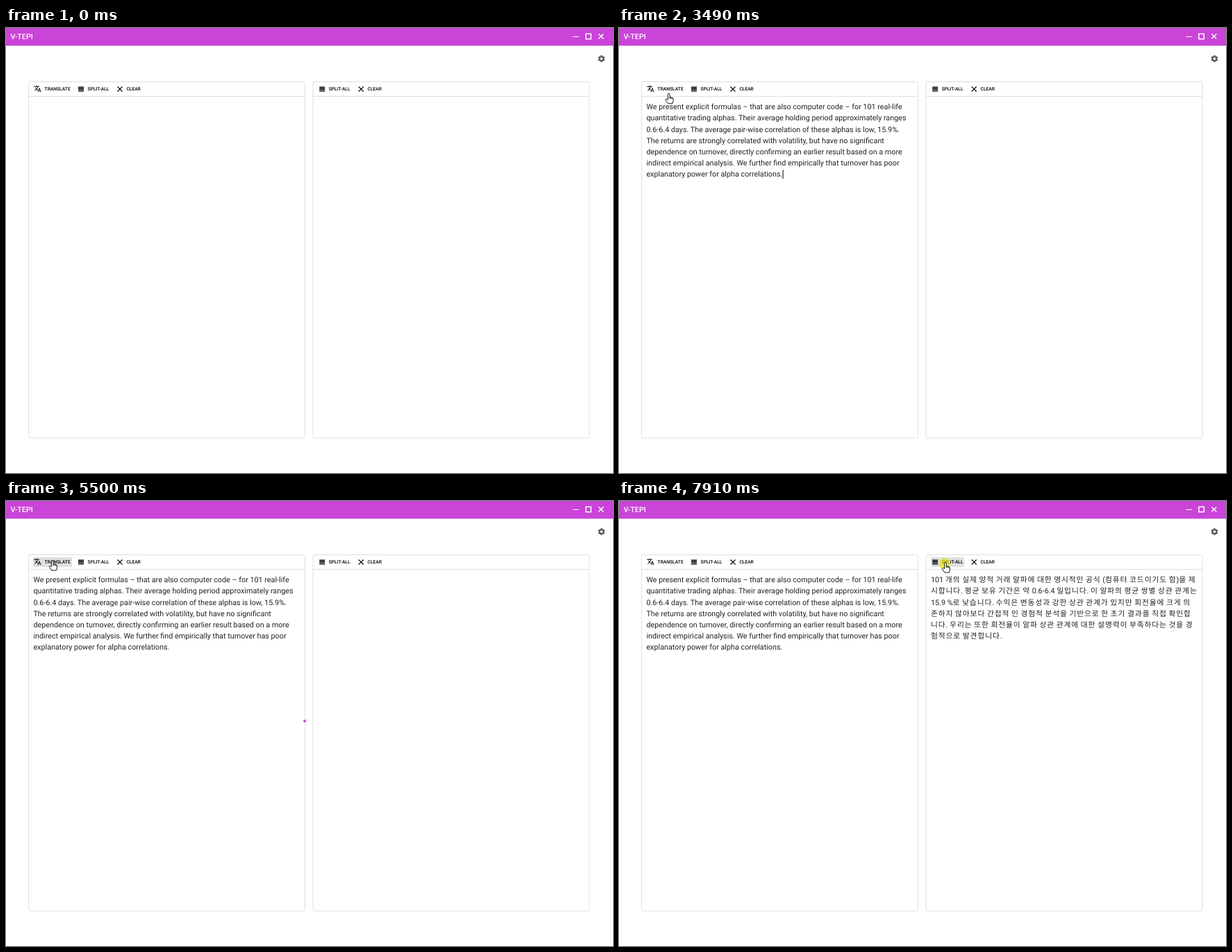
These frames come from a looping animation (874x641 px, 7990 ms). An HTML page:

```html
<!DOCTYPE html>
<html lang="en">
<head>
<meta charset="utf-8">
<title>Translator window</title>
<style>
  html, body { margin: 0; width: 100%; height: 100%; overflow: hidden; background: #fff; }
  svg { display: block; width: 100%; height: 100%; }
  text { font: 10.79px Roboto, "Noto Sans CJK KR", "Noto Sans CJK", sans-serif; fill: #222; white-space: pre; text-rendering: geometricPrecision; }
  .title { font-weight: 500; fill: #fff; }
  .label { font-size: 6.7px; font-weight: 500; fill: #000; }
  .hangul { letter-spacing: .08em; }
  .panel { fill: none; stroke: #dfdfdf; }
  .stroke { fill: none; stroke: #000; stroke-width: 1.1; }
  .white { stroke: #fff; stroke-width: 1.5; }
  .pointer { fill: #fff; stroke: #000; stroke-width: .9; stroke-linejoin: round; }
</style>
</head>
<body>
<svg viewBox="0 0 874 641">
  <defs>
    <path id="cross" d="M-3.5-3.5 3.5 3.5M3.5-3.5-3.5 3.5"/>
    <path id="lines" d="M-4-2.9h8M-4-1h8M-4 .9h8M-4 2.8h8"/>
    <clipPath id="buttonClip"><rect x="39" y="81" width="56" height="14" rx="1.5"/></clipPath>
  </defs>

  <rect width="874" height="25.5" fill="#c944d7"/>
  <text class="title" x="6.6" y="15.8">V-TEPI</text>
  <path class="stroke white" style="stroke-width:1" d="M816 12.5h9"/>
  <rect class="stroke white" x="834.9" y="8.4" width="7.4" height="7.4"/>
  <use class="stroke white" href="#cross" transform="translate(856.8 12)"/>
  <g transform="translate(857.4 44.2)" fill="none" stroke="#555">
    <circle r="2.9" stroke-width="2"/>
    <circle r="4.2" stroke-width="1.7" pathLength="6" stroke-dasharray=".5 .5" stroke-dashoffset="-.25"/>
  </g>

  <rect id="hoverLeft" x="39" y="81" width="56" height="14" rx="1.5"/>
  <rect id="hoverRight" x="449" y="81" width="48" height="14" rx="1.5"/>
  <g clip-path="url(#buttonClip)"><circle id="ripple" cx="67" cy="88"/></g>

  <path transform="translate(39.8 81.9) scale(.47)" d="M12.87 15.07l-2.54-2.51.03-.03c1.74-1.94 2.98-4.17 3.71-6.53H17V4h-7V2H8v2H1v1.99h11.17C11.5 7.92 10.44 9.75 9 11.35 8.07 10.32 7.3 9.19 6.69 8h-2c.73 1.63 1.73 3.17 2.98 4.56l-5.09 5.02L4 19l5-5 3.11 3.11.76-2.04zM18.5 10h-2L12 22h2l1.12-3h4.75L21 22h2l-4.5-12zm-2.62 7l1.62-4.33L19.12 17h-3.24z"/>
  <text class="label" x="55.6" y="90.3">TRANSLATE</text>
  <g id="panels"></g>
  <g id="english"></g>
  <g id="korean"></g>
  <rect id="caret" width="1" fill="#000"/>

  <circle id="spinner" r="18.4" fill="none" stroke="#c944d7" stroke-width="3.3" pathLength="125.66"/>
  <circle id="click" r="8.2" fill="#eee600" opacity=".65"/>
  <g id="cursor">
    <path id="arrow" class="pointer" d="M0 0V12.5L2.9 9.9 4.9 14.4 6.8 13.5 4.9 9.2H8.8Z"/>
    <path id="beam" class="stroke" d="M-2.5-5H-.8L0-4.4.8-5H2.5M0-4.4V4.4M-2.5 5H-.8L0 4.4.8 5H2.5"/>
    <g id="hand">
      <path class="pointer" d="M-1.3 9V1.2a1.3 1.3 0 0 1 2.6 0V5.4L3.2 5.6 5 6.2 6.4 7.2V10.5L5.3 14.5H-1.2L-4.4 9.7a1 1 0 0 1 1.6-1.3Z"/>
      <path class="pointer" d="M1.3 5.4v2.4M3.2 5.6v2.2M5 6.2v1.8"/>
    </g>
  </g>
</svg>
<script>
const LOOP = 7990, LINE = 16.2, FIRST_BASELINE = 117.2;
const $ = id => document.getElementById(id);
const set = (id, attrs) => { for (const k in attrs) $(id).setAttribute(k, attrs[k]); };
const show = (id, on) => { $(id).style.display = on ? '' : 'none'; };
const clamp = v => Math.max(0, Math.min(1, v));
const within = (v, a, b) => v >= a && v < b;
// Close to the CSS ease-in-out curve.
const ease = p => p ** 1.74 / (p ** 1.74 + (1 - p) ** 1.74);

const english = [
  'We present explicit formulas – that are also computer code – for 101 real-life',
  'quantitative trading alphas. Their average holding period approximately ranges',
  '0.6-6.4 days. The average pair-wise correlation of these alphas is low, 15.9%.',
  'The returns are strongly correlated with volatility, but have no significant',
  'dependence on turnover, directly confirming an earlier result based on a more',
  'indirect empirical analysis. We further find empirically that turnover has poor',
  'explanatory power for alpha correlations.'
];
const korean = [
  '101 개의 실제 양적 거래 알파에 대한 명시적인 공식 (컴퓨터 코드이기도 함)을 제',
  '시합니다. 평균 보유 기간은 약 0.6-6.4 일입니다. 이 알파의 평균 쌍별 상관 관계는',
  '15.9 %로 낮습니다. 수익은 변동성과 강한 상관 관계가 있지만 회전율에 크게 의',
  '존하지 않아보다 간접적 인 경험적 분석을 기반으로 한 초기 결과를 직접 확인합',
  '니다. 우리는 또한 회전율이 알파 상관 관계에 대한 설명력이 부족하다는 것을 경',
  '험적으로 발견합니다.'
];
const paragraph = (lines, x) => lines.map((line, i) =>
  `<text x="${x}" y="${FIRST_BASELINE + i * LINE}">${
    line.replace(/[가-힣]+/g, '<tspan class="hangul">$&</tspan>')}</text>`).join('');
const panel = (x, tools) => `
  <rect class="panel" x="${x}" y="77.5" width="398" height="513" rx="3"/>
  <path class="panel" d="M${x} 98.5h398"/>
  <use class="stroke" style="stroke-width:1.3" href="#lines" transform="translate(${tools} 88)"/>
  <text class="label" x="${tools + 9.6}" y="90.3">SPLIT-ALL</text>
  <use class="stroke" href="#cross" transform="translate(${tools + 56} 88)"/>
  <text class="label" x="${tools + 65.4}" y="90.3">CLEAR</text>`;
$('panels').innerHTML = panel(32.5, 108) + panel(442, 455.2);
$('english').innerHTML = paragraph(english, 39.4);
$('korean').innerHTML = paragraph(korean, 449);

// Each move runs in equal steps along a quadratic curve.
const moves = [
  { start: 760, end: 1300, steps: 8, from: [710, 645], via: [445, 469], to: [179.8, 292.5] },
  { start: 3100, end: 3560, steps: 7, from: [179.8, 292.5], via: [123, 189], to: [67, 85.5] },
  { start: 6590, end: 7280, steps: 10, from: [67, 85.5], via: [268, -17], to: [470, 88.5] }
];
const clicks = [[1450, 1620, 178, 291.5], [4040, 4190, 66, 87.5], [7830, LOOP, 469, 90.5]];
const caretOn = [[1450, 2020], [2250, 2780], [3310, 3790]];

function drawCursor(t) {
  const move = moves.filter(m => t >= m.start).pop();
  show('cursor', move);
  if (!move) return;
  const { start, end, steps, from, via, to } = move;
  const step = Math.floor((t - start) / (end - start) * (steps - 1) + 1e-6) + 1;
  const p = ease(clamp(step / steps)), q = 1 - p;
  const [x, y] = [0, 1].map(i => q * q * from[i] + 2 * p * q * via[i] + p * p * to[i]);
  const inText = within(y, 98, 591) && (within(x, 33, 430) || within(x, 442, 840));
  const onButton = within(y, 81, 95) && (within(x, 39, 95) || within(x, 449, 497));
  show('beam', inText);
  show('hand', onButton);
  show('arrow', !inText && !onButton);
  set('cursor', { transform: `translate(${x} ${y})` });
}

function drawSpinner(t) {
  const age = 4040 + Math.floor((t - 4040) / 76.6) * 76.6 - 4080;
  const on = age >= 0 && t < 5660;
  show('spinner', on);
  if (!on) return;
  const phase = age % 1500 / 750;
  const grow = ease(clamp(phase)), slide = ease(clamp(phase - 1));
  set('spinner', {
    transform: `translate(436.7 334.2) rotate(${age * 360 / 2000})`,
    'stroke-dasharray': `${1 + 88 * grow} 200`,
    'stroke-dashoffset': -(35 * grow + 89 * slide)
  });
}

function draw(t) {
  show('english', t >= 2250);
  show('korean', t >= 5660);

  show('caret', caretOn.some(([a, b]) => within(t, a, b)));
  const pasted = t >= 2250;
  set('caret', { x: pasted ? 235.6 : 39.6, y: pasted ? 204.3 : 107, height: 12.8 });

  const click = clicks.find(([a, b]) => within(t, a, b));
  show('click', click);
  if (click) set('click', { cx: click[2], cy: click[3] });

  const fade = start => clamp((t - start) / 400);
  set('hoverLeft', { opacity: .12 * (fade(3560) - fade(6590)) });
  set('hoverRight', { opacity: .12 * fade(7280) });
  const spread = clamp((t - 4080) / 250);
  set('ripple', {
    r: t < 4080 ? 0 : 29 * (.2 + .8 * (1 - (1 - spread) ** 1.4)),
    opacity: .2 * (1 - clamp((t - 4330) / 200))
  });

  drawSpinner(t);
  drawCursor(t);
}

const began = performance.now();
function tick() {
  draw((performance.now() - began) % LOOP);
  requestAnimationFrame(tick);
}
tick();
</script>
</body>
</html>
```
